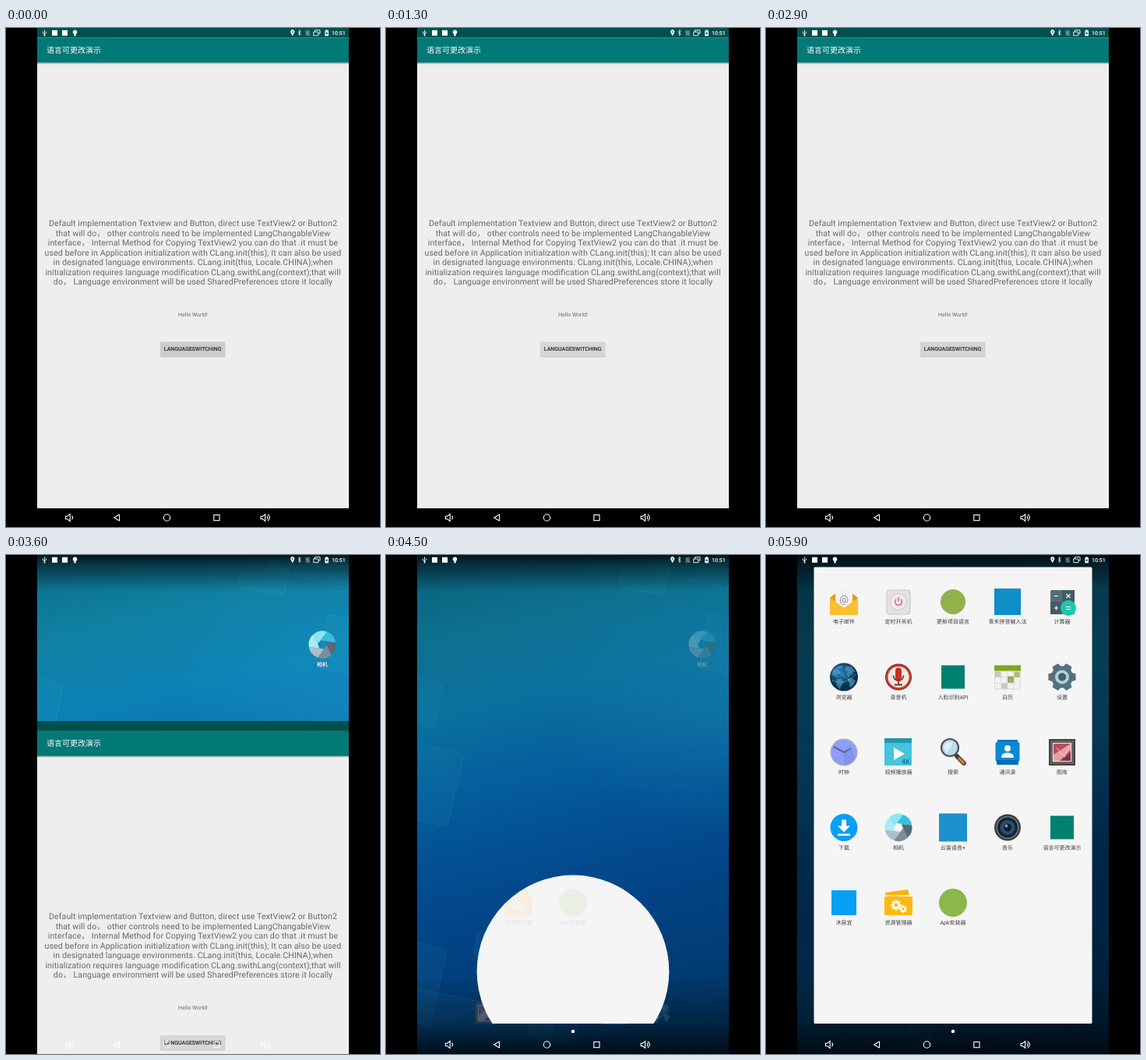
An HTML page that plays this animation: 480x640 px, repeating every 6 s.

```html
<!DOCTYPE html>
<html lang="zh-CN">
<head>
<meta charset="utf-8">
<title>语言可更改演示</title>
<style>
html, body { margin: 0; width: 100%; height: 100%; overflow: hidden; background: #000; }
svg { display: block; width: 480px; height: 640px; }
text { font-family: Roboto, "Noto Sans CJK SC", "Noto Sans CJK", sans-serif; text-rendering: geometricPrecision; white-space: pre; }
.mid { text-anchor: middle; }
.message { letter-spacing: .07px; }
</style>
</head>
<body>
<svg id="stage" viewBox="0 0 480 640" xmlns="http://www.w3.org/2000/svg"></svg>
<script>
const LOOP = 6000, STEP = 100;
const stage = document.getElementById('stage');

// Markup helpers
const rect = (x, y, w, h, fill, more = '') => `<rect x="${x}" y="${y}" width="${w}" height="${h}" fill="${fill}" ${more}/>`;
const disc = (x, y, r, fill, more = '') => `<circle cx="${x}" cy="${y}" r="${r}" fill="${fill}" ${more}/>`;
const path = (d, fill, more = '') => `<path d="${d}" fill="${fill}" ${more}/>`;
const line = (d, color, width = 1, more = '') => path(d, 'none', `stroke="${color}" stroke-width="${width}" ${more}`);
const text = (s, x, y, size, fill, more = '') => `<text x="${x}" y="${y}" font-size="${size}" fill="${fill}" ${more}>${s}</text>`;
const mid = (s, x, y, size, fill, more = '') => text(s, x, y, size, fill, `class="mid" ${more}`);
const at = (x, y, body, scale = 1) => `<g transform="translate(${x} ${y}) scale(${scale})">${body}</g>`;
const fade = (id, stops, extra = 'x2="0" y2="1"') => `<linearGradient id="${id}" ${extra}>` +
  stops.map(([o, c, a = 1]) => `<stop offset="${o}" stop-color="${c}" stop-opacity="${a}"/>`).join('') + '</linearGradient>';

const polar = (r, deg) => {
  const a = deg * Math.PI / 180;
  return `${(r * Math.cos(a)).toFixed(2)} ${(r * Math.sin(a)).toFixed(2)}`;
};

function gear(r, inner, teeth) {
  const step = 360 / teeth, pts = [];
  for (let i = 0; i < teeth; i++) {
    const a = i * step;
    pts.push(polar(inner, a - step * .34), polar(r, a - step * .2), polar(r, a + step * .2), polar(inner, a + step * .34));
  }
  return 'M' + pts.join('L') + 'Z';
}

function aperture() {
  const tones = ['#566b78', '#78909c', '#b0bec5', '#a9eaf6', '#8fe3f2', '#35bfdd'];
  return tones.map((c, i) => {
    const a = i * 60 - 10;
    return path(`M${polar(17.5, a)}A17.5 17.5 0 0 1 ${polar(17.5, a + 60)}L${polar(6, a + 20)}L${polar(6, a - 40)}Z`, c);
  }).join('');
}

const tile = (size, fill) => rect(-size / 2, -size / 2, size, size, fill);

// Icons, each about 36 units wide around its centre
const icons = {
  mail: path('M-18-5L-8-13H8L18-5V6H-18Z', '#e79a18') + rect(-11, -17, 22, 25, '#f3f3f3', 'rx="1"') +
    mid('@', 0, .5, 13, '#8b8b8b') + path('M-18-5L0 8L18-5V15Q18 17 16 17H-16Q-18 17-18 15Z', '#fbc02d') +
    line('M-18 17L-3 6M18 17L3 6', '#f2b01e', .8),
  power: rect(-15, -15, 30, 31, '#e2e2e2', 'rx="3" stroke="#bdbdbd" stroke-width=".8"') +
    disc(0, 0, 10.5, '#f1eaec', 'stroke="#d3bcc4" stroke-width=".8"') + line('M-3-3.2A4.4 4.4 0 1 0 3-3.2M0-5.8V-.5', '#dc5580', 1.4),
  robot: disc(0, 0, 16, '#8fb24d'),
  pinyin: tile(34, '#0e8fc7'),
  calc: rect(-15, -15, 31, 31, '#546e7a', 'rx="1.5"') + rect(0, -15, 16, 15, '#455a64') + rect(-15, 0, 15, 16, '#455a64') +
    line('M-10-7.5H-5M5.5-10L10.5-5M10.5-10L5.5-5M-10 8H-5M-7.5 5.5V10.5', '#fff', 1.2) +
    disc(8, 8, 10, '#1dc9ae') + line('M5 6.5H11M5 9.5H11', '#fff', 1.2),
  globe: disc(0, 0, 18, 'url(#sea)') +
    path('M-14-9L-8-14L-1-15L-3-11L-7-10L-4-6L-9-3L-7 1L-12-1L-16-3ZM-10 3L-4 2L0 6L-3 10L-5 16L-9 11ZM3-14L10-13L15-6L11-7L12-2L8-4L7 1L3-3L5-7L1-9ZM4 3L10 1L15 5L11 12L7 13L7 8Z', '#5aa5cb', 'opacity=".6"') +
    line('M-15 4Q0 12 16-4M-13-8Q4-2 12 10', '#a6ddeb', .6, 'stroke-dasharray="2 1.5"'),
  voice: disc(0, 0, 17, '#8f2a22') + disc(0, 0, 15.8, '#c9392b') + disc(0, 0, 13.6, '#efe9e4') +
    rect(-4, -12, 8, 16, '#c62f20', 'rx="4"') + line('M-6.5-2A6.5 6.5 0 0 0 6.5-2M0 5V10M-5 10H5', '#8d2a20', 1.8),
  demo: tile(30, '#00806f'),
  calendar: rect(-17, -15, 34, 31, '#dadada') + rect(-17, -15, 34, 7, '#80a51c') +
    [0, 1, 2, 3, 4, 5, 6, 7, 8, 9, 10, 11].map(i => rect(-16 + i % 4 * 8.2, -7 + (i >> 2) * 7.6, 7.4, 6.8, i % 3 ? '#f2f2ee' : '#c5cbb7')).join('') +
    rect(0, -1, 8, 8, '#9aab65') + rect(9, -6, 6, 6, '#a9bd66'),
  settings: path(gear(17.2, 13.4, 6), '#566f7c', 'stroke="#566f7c" stroke-width="1.5" stroke-linejoin="round"') +
    disc(0, 0, 12.5, '#566f7c') + disc(0, 0, 7, 'none', 'stroke="#a9d3df" stroke-width="4"') + disc(0, 0, 5, '#465c68'),
  clock: disc(0, 0, 17.5, '#a9afb8') + disc(0, 0, 16, '#8c9eff') + path('M0 0L9-5L14.4 7A16 16 0 0 1 0 16Z', '#8192ee') +
    line('M-13-7L0 0L9-5', '#5a688f', 2),
  video: rect(-18, -18, 35, 35, '#45c4de', 'rx="1"') + rect(-18, -18, 35, 6, '#2596ae') +
    path('M-6-6L8 2L-6 10Z', '#fff') + text('4K', 4, 15, 9, '#155c73'),
  search: line('M5 5L14 14', '#4b3c36', 6, 'stroke-linecap="round"') + line('M8 8L13.5 13.5', '#c48136', 3.5, 'stroke-linecap="round"') +
    disc(-4, -6, 11, '#badcec', 'stroke="#4c5357" stroke-width="2.2"') + path('M-12-6A8 8 0 0 1 0-12L-8 1Z', '#eaf6fb', 'opacity=".75"'),
  people: rect(-13, -16, 26, 10, '#0878bd') + rect(-15.5, -13, 31, 25, '#078ad4', 'rx="2"') + rect(-14, 10, 28, 6, '#056bb2', 'rx="1"') +
    disc(0, -5, 4, '#fff') + path('M-8 7Q-8 .5 0 .5Q8 .5 8 7Z', '#fff'),
  gallery: rect(-17, -17, 34, 34, '#47433f') + rect(-15, -15, 30, 30, '#66615d') + rect(-12, -12, 24, 24, '#f1e8e5') +
    rect(-11, -11, 22, 22, '#b84b65') + path('M-11 11V3L11-11V-3L-3 11Z', '#e7a0a3') + path('M-2 11L11 0V11Z', '#7e344f') + line('M-7-6L3 6L9-8', '#f0cba7', 1),
  download: disc(0, 0, 17.5, '#08a0f5') + path('M-3-10H3V-2H8L0 6L-8-2H-3Z', '#fff') + rect(-8, 8, 16, 2.5, '#fff'),
  camera: aperture(),
  speech: tile(36, '#1c91cf'),
  music: disc(0, 0, 17, '#3b4046') + disc(0, 0, 14.5, '#70777d') + disc(0, 0, 13, '#17232f') +
    disc(0, 0, 9.5, '#284e7a') + disc(0, 0, 5, '#101b2a') + disc(-1.5, -2, 2, '#7199bc'),
  home: tile(32, '#08a0f5'),
  files: path('M-17-13L12-17L14-10L-16-7Z', '#f5b113') + rect(-18, -8, 36, 24, '#fdb913', 'rx="1.5"') +
    line('M-17-9H18', '#fff', 1.2) + path(gear(7, 5, 8), '#fff', 'transform="translate(-3 3)"') + disc(-3, 3, 2.4, '#fdb913') +
    path(gear(5, 3.6, 8), '#fff', 'transform="translate(6 8)"') + disc(6, 8, 1.7, '#fdb913'),
  installer: disc(0, 0, 18, '#8ab84a'),
  apps: disc(0, 0, 12.5, '#fff') + [0, 1, 2, 3, 4, 5].map(i => disc(i % 3 * 5 - 5, i < 3 ? -2.5 : 2.5, 1.4, '#34464f')).join('')
};

const drawer = [
  ['mail', '电子邮件'], ['power', '定时开关机'], ['robot', '更新项目语言'], ['pinyin', '青禾拼音输入法'], ['calc', '计算器'],
  ['globe', '浏览器'], ['voice', '录音机'], ['demo', '人脸识别API'], ['calendar', '日历'], ['settings', '设置'],
  ['clock', '时钟'], ['video', '视频播放器'], ['search', '搜索'], ['people', '通讯录'], ['gallery', '图库'],
  ['download', '下载'], ['camera', '相机'], ['speech', '云笛语音+'], ['music', '音乐'], ['demo', '语言可更改演示'],
  ['home', '沐居宜'], ['files', '资源管理器'], ['installer', 'Apk安装器']
];

const message = [
  'Default implementation Textview and Button, direct use TextView2 or Button2',
  'that will do， other controls need to be implemented LangChangableView',
  'interface， Internal Method for Copying TextView2 you can do that .it must be',
  'used before in Application initialization with CLang.init(this); It can also be used',
  'in designated language environments. CLang.init(this, Locale.CHINA);when',
  'initialization requires language modification CLang.swithLang(context);that will',
  'do， Language environment will be used SharedPreferences store it locally'
];

const defs = `<defs>
  ${fade('sky', [[0, '#0d7391'], [.12, '#1082a4'], [.27, '#0c80b5'], [.42, '#076db3'], [.56, '#045ba7'], [.72, '#034d97'], [.86, '#034585'], [1, '#033c6c']], 'x1=".4" x2=".55" y1="0" y2="1"')}
  ${fade('topShade', [[0, '#000', .8], [.3, '#000', .5], [1, '#000', 0]])}
  ${fade('baseShade', [[0, '#000', 0], [.6, '#000', .3], [1, '#000', .78]])}
  ${fade('barShade', [[0, '#000', .3], [1, '#000', 0]])}
  <radialGradient id="glow"><stop stop-color="#25a5cc" stop-opacity=".35"/><stop offset="1" stop-color="#25a5cc" stop-opacity="0"/></radialGradient>
  <radialGradient id="sea" cx=".4" cy=".35"><stop stop-color="#2282b5"/><stop offset="1" stop-color="#0b2f51"/></radialGradient>
  <clipPath id="screen"><rect x="40" width="400" height="640"/></clipPath>
  <clipPath id="reveal"><circle id="hole" cx="240" cy="588" r="0"/></clipPath>
</defs>`;

const pane = (x, y, w, h, turn) => rect(x, y, w, h, '#3fc0d6', `fill-opacity=".06" stroke="#5fd0d8" stroke-opacity=".14" rx="5" transform="rotate(${turn} ${x} ${y})"`);
const wallpaper = rect(40, 0, 400, 640, 'url(#sky)') +
  '<ellipse cx="440" cy="190" rx="230" ry="170" fill="url(#glow)"/>' +
  pane(22, 237, 80, 96, 13) + pane(26, 155, 49, 58, 12) + pane(20, 493, 60, 100, 13) + pane(118, 482, 33, 33, 10) +
  pane(40, 556, 180, 110, 12) + pane(195, 557, 60, 60, 13) + pane(308, -14, 60, 56, 10) + pane(414, 76, 50, 70, 10) + pane(350, -30, 120, 50, 14) +
  rect(40, 0, 400, 46, 'url(#topShade)') + rect(40, 540, 400, 100, 'url(#baseShade)');

const dock = [['gallery', 128], ['settings', 184], ['video', 295], ['globe', 352]]
  .map(([name, x]) => at(x, 587.5, icons[name], .84)).join('');

const launcher = wallpaper +
  `<g id="home">${at(406, 115, icons.camera)}${mid('相机', 406.5, 143.4, 7, '#012', 'font-weight="700" opacity=".7"')}${mid('相机', 406, 142.8, 7, '#fff', 'font-weight="700"')}
  ${disc(240, 562, 2.2, '#fff')}${dock}${at(240, 588, icons.apps)}</g>` +
  rect(40, 0, 400, 640, '#000a12', 'id="dim"') +
  `<g clip-path="url(#reveal)">${rect(61.5, 15.5, 357, 585.5, '#f5f5f5', 'rx="1.5"')}<g id="grid">` +
  drawer.map(([name, label], i) => {
    const x = 100 + i % 5 * 70, y = 60 + Math.floor(i / 5) * 96.5;
    return at(x, y, icons[name]) + mid(label, x, y + 28.4, 7, '#3c3c3c');
  }).join('') + '</g></g>' + disc(240, 611, 2.2, '#fff', 'id="dot"');

const app = rect(40, 0, 400, 640, '#000') + rect(40, 12, 400, 604, '#eee') +
  rect(40, 0, 400, 12.5, '#00504e') + rect(40, 12.5, 400, 32, '#007977') + rect(40, 44.5, 400, 2.5, 'url(#barShade)') +
  text('语言可更改演示', 52, 32, 10, '#fff', 'font-weight="500"') +
  '<g class="message">' + message.map((s, i) => mid(s, 240, 254 + i * 12.5, 10.667, '#696969')).join('') + '</g>' +
  mid('Hello World!', 240, 369.5, 7, '#696969') +
  rect(198, 403.5, 83.5, 18.8, '#000', 'rx="1.5" opacity=".16"') + rect(198.3, 402.6, 82.7, 18.5, '#d6d6d6', 'id="button" rx="1"') +
  mid('LANGUAGESWITCHING', 239.7, 414.2, 7, '#212121', 'font-weight="500"');

const speaker = 'M-4-1.5H-2L1-4V4L-2 1.5H-4Z';
const bars =
  line('M49.5 2.5V10M47.3 4.5V6.5L49.5 8L51.7 6V4.5', '#fff', .9) + disc(49.5, 9.5, 1, '#fff') +
  rect(59, 2.8, 7, 7, '#fff') + rect(72, 2.8, 7, 7, '#fff') +
  disc(88.5, 5.2, 2.7, '#fff') + rect(87.4, 7, 2.2, 3.4, '#fff') +
  path('M367.7 10.2L365.7 6.5A2.6 2.6 0 1 1 369.7 6.5Z', '#fff') + disc(367.7, 5.1, .9, '#00504e') +
  line('M374.8 4.3L378.4 7.7L376.6 9.6V2.6L378.4 4.4L374.8 7.8', '#fff', .7) +
  path('M384.5 4.5L386.5 2.7H389.8V9.7H384.5Z', '#fff', 'opacity=".3"') + line('M383.7 2.8L390.5 10', '#fff', .7, 'opacity=".4"') +
  line('M396.5 5V2.7H403V7H401M394.7 5H400.8V9.7H394.7Z', '#fff', .9) +
  path('M409.3 3.2H410.7V2.3H412.5V3.2H413.9V10.2H409.3Z', '#fff') + rect(410.6, 5.5, 2, 2.6, '#345') +
  text('10:51', 418, 8.8, 7, '#fff', 'font-weight="500"') +
  at(81, 628, line(speaker + 'M3-2Q5 0 3 2', '#fff', 1), 1.15) +
  line('M138.5 628L145.5 624V632Z', '#fff', 1.1, 'stroke-linejoin="round"') +
  disc(206.5, 628, 4.2, 'none', 'stroke="#fff" stroke-width="1.1"') +
  rect(266.8, 624.5, 7.2, 7.2, 'none', 'stroke="#fff" stroke-width="1.1"') +
  at(331.5, 628, line(speaker + 'M3-2Q5 0 3 2M4-4Q8.5 0 4 4', '#fff', 1), 1.1);

stage.innerHTML = defs + rect(0, 0, 480, 640, '#000') +
  `<g clip-path="url(#screen)">${launcher}<g id="app">${app}</g>${bars}</g>`;

const el = {};
for (const id of ['app', 'button', 'home', 'dim', 'hole', 'grid', 'dot']) el[id] = document.getElementById(id);

const part = (t, start, span) => Math.min(1, Math.max(0, (t - start) / span));
const smooth = u => u * u * (3 - 2 * u);
const presses = [[-200, 100], [600, 900], [1850, 2050], [2550, 2750]];

function draw(t) {
  const press = Math.max(...presses.map(([a, b]) => part(t, a, 100) * (1 - part(t, b, 180))));
  const grey = Math.round(214 - 10 * press);
  el.button.setAttribute('fill', `rgb(${grey},${grey},${grey})`);

  const slide = smooth(part(t, 3490, 300));
  el.app.setAttribute('transform', `translate(0 ${(slide * 700).toFixed(2)})`);
  el.app.style.display = slide < 1 ? '' : 'none';

  const open = smooth(part(t, 4410, 320));
  el.home.setAttribute('opacity', 1 - part(t, 4390, 190));
  el.dim.setAttribute('opacity', .6 * smooth(part(t, 4400, 330)));
  el.hole.setAttribute('r', open * 640);
  el.hole.setAttribute('cy', 588 - open * 280);
  el.grid.setAttribute('opacity', part(t, 4480, 220));
  el.dot.setAttribute('opacity', part(t, 4300, 90));
}

const begin = performance.now();
function tick() {
  const t = (performance.now() - begin) % LOOP;
  draw(Math.floor((t + 4) / STEP) * STEP % LOOP);
  requestAnimationFrame(tick);
}
tick();
</script>
</body>
</html>
```
